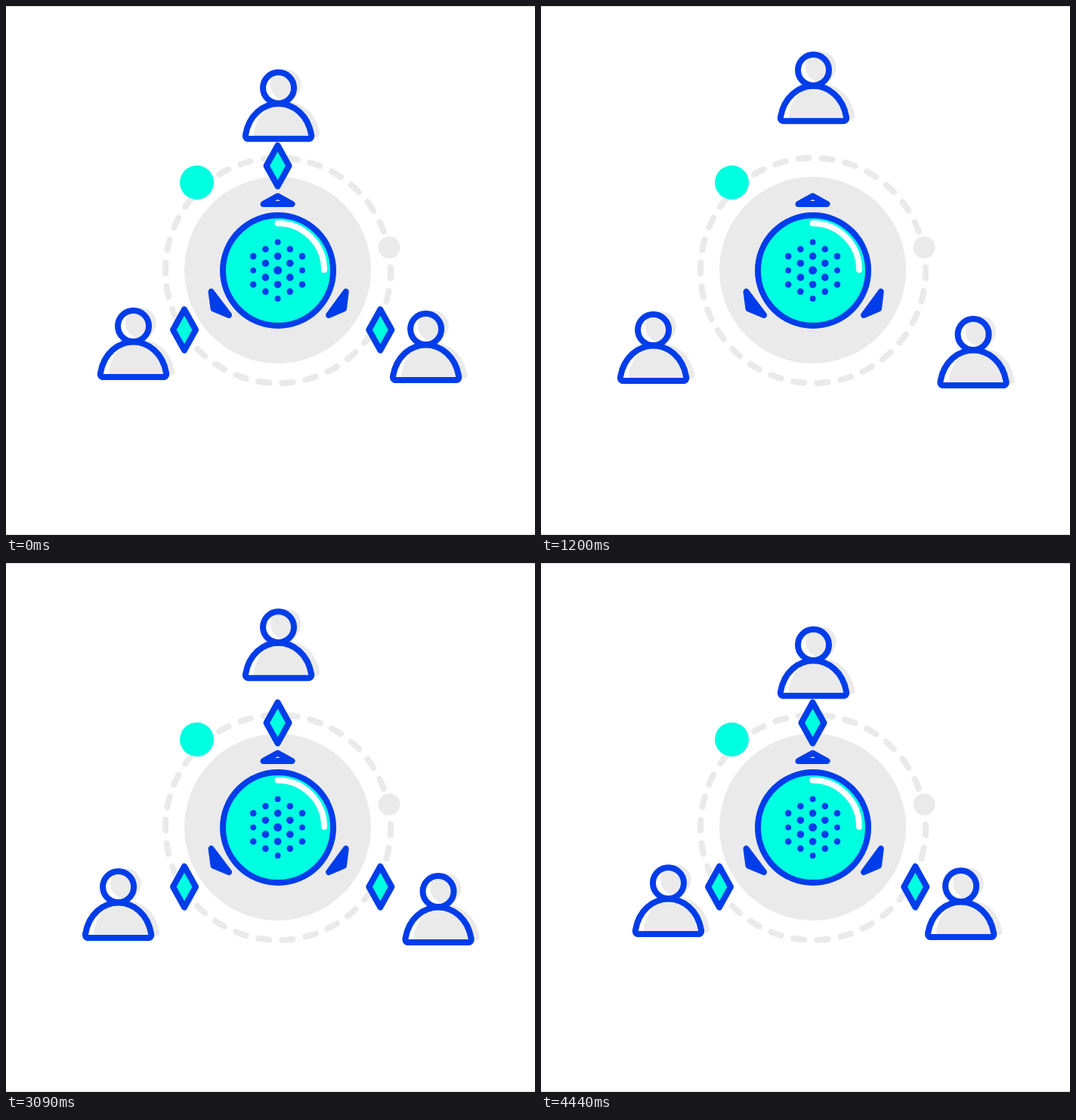
An HTML page for the animation above (4.5 s loop, 700 px wide and 700 px high).

```html
<!DOCTYPE html>
<html lang="en">
<head>
<meta charset="utf-8">
<title>Orb and people</title>
<style>
  html, body { margin: 0; width: 100%; height: 100%; overflow: hidden; background: #fff; }
  svg { display: block; width: 100vw; height: 100vh; }
  .gray { fill: #eaeaea; }
  .mint { fill: #00ffe1; }
  .blue { fill: #003dea; }
  .line { stroke: #003dea; stroke-width: 8; stroke-linejoin: round; }
  .hollow { fill: none; }
</style>
</head>
<body>
<svg id="stage" viewBox="0 0 700 700">
  <defs>
    <path id="body" d="M-39 67.5H39Q44.5 67.5 43.5 62C39 36 20 21 0 21C-20 21-39 36-43.5 62Q-44.5 67.5-39 67.5Z"/>
    <g id="person">
      <circle class="gray" cx="9.8" cy="-4" r="20.3"/>
      <use class="gray" href="#body" x="11" y="-2.5"/>
      <circle class="line hollow" r="20.5"/>
      <use class="line hollow" href="#body"/>
    </g>
  </defs>

  <path d="M0 .5H700M0 699.5H700" stroke="#dcdcdc"/>
  <circle cx="360" cy="350" r="149" fill="none" stroke="#eaeaea" stroke-width="8" stroke-linecap="round"
    pathLength="360" stroke-dasharray="5.4 6.6" transform="rotate(-1.5 360 350)"/>
  <circle class="gray" cx="359.5" cy="349.5" r="123.5"/>
  <circle class="gray" cx="507" cy="319.5" r="14.5"/>
  <circle class="mint" cx="252.5" cy="233.5" r="22.5"/>

  <g class="line">
    <path class="gray" d="M340.5 262L359.5 251.5L378.5 262Z"/>
    <path class="blue" d="M271.5 378L274.5 400.5L295 409Z"/>
    <path class="blue" d="M449.7 378L447 400.5L427 409Z"/>
    <circle class="mint" cx="360" cy="350" r="73"/>
  </g>
  <path d="M359.5 287.5A61.5 61.5 0 0 1 421 349" fill="none" stroke="#fff" stroke-width="8" stroke-linecap="round"/>
  <g id="grid" class="blue"></g>
  <g id="gems"></g>
  <g id="people"></g>
</svg>
<script>
const LOOP = 4500, STEP = 30;
const $ = id => document.getElementById(id);
const lerp = (a, b, p) => a + (b - a) * p;
const mix = (a, b, p) => a.map((v, i) => lerp(v, b[i], p));
const span = (t, from, to) => Math.min(1, Math.max(0, (t - from) / (to - from)));
const easeInOut = p => p < .5 ? 4 * p ** 3 : 1 - 4 * (1 - p) ** 3;

function add(parent, tag, attrs) {
  const el = document.createElementNS('http://www.w3.org/2000/svg', tag);
  for (const k in attrs) el.setAttribute(k, attrs[k]);
  return parent.appendChild(el);
}

// Interpolates rows of [key, ...values], sorted by key.
function track(rows, x) {
  let i = 1;
  while (i < rows.length - 1 && x > rows[i][0]) i++;
  const [a, b] = [rows[i - 1], rows[i]];
  return mix(a, b, span(x, a[0], b[0])).slice(1);
}

// Speaker holes: hexagonal rows, larger towards the middle.
for (let c = -2; c <= 2; c++) {
  const n = 5 - Math.abs(c);
  for (let i = 0; i < n; i++) {
    const x = c * 16.2, y = (i - (n - 1) / 2) * 18.7;
    const d = Math.hypot(x, y);
    const r = d < 1 ? 5.5 : d < 20 ? 4.8 : c === 0 || Math.abs(y) > 30 || Math.abs(y) < 1 ? 3.9 : 4.3;
    add($('grid'), 'circle', { cx: 359.6 + x, cy: 349.8 + y, r });
  }
}

const people = [
  { near: [360.5, 108.3], far: [360.5, 84.7] },
  { near: [168.5, 423.5], far: [148.6, 428.5] },
  { near: [555.6, 427.5], far: [572, 434.5] }
].map(p => ({ ...p, el: add($('people'), 'use', { href: '#person' }) }));

const gems = [
  { home: [359.5, 211.5], out: [359.5, 166.5], from: [359.5, 213], to: [359.5, 166] },
  { home: [236, 428.5], out: [192, 455], from: [262, 411], to: [199.5, 450] },
  { home: [495.3, 428.5], out: [537, 456.5], from: [487, 426], to: [532.5, 455] }
].map(g => ({ ...g, el: add($('gems'), 'path', { class: 'line mint' }) }));

// size, half width, half height, roundness, stroke
const shapes = [
  [0, 0, 0, 1, 0],
  [.25, 6, 6.7, 1, 3],
  [.45, 8.5, 12, 1, 5],
  [.8, 11.5, 21, .6, 7],
  [1, 15, 27, 0, 8]
];
const shrink = [[510, 1], [540, .92], [570, .8], [600, .62], [630, .45], [750, .31], [900, .25], [1170, .17]];
const grow = [[2460, 0], [2490, .05], [2700, .25], [3000, .45], [3030, .62], [3060, .8], [3090, 1]];

// A rhombus that rounds off into an ellipse as k goes from 0 to 1.
function gemPath([x, y], w, h, k) {
  const a = lerp(1 / 3, .552, k), b = lerp(2 / 3, 1, k);
  const pt = (u, v) => `${x + u * w} ${y + v * h}`;
  const arc = (...p) => 'C' + p.map(q => pt(...q)).join(' ');
  return 'M' + pt(0, -1) +
    arc([a, -b], [b, -a], [1, 0]) + arc([b, a], [a, b], [0, 1]) +
    arc([-a, b], [-b, a], [-1, 0]) + arc([-b, -a], [-a, -b], [0, -1]) + 'Z';
}

function gemState(g, t) {
  if (t < 1200) return [mix(g.home, g.out, span(t, 870, 1170) ** 2), track(shrink, t)[0]];
  if (t >= 2490) return [g.home, track(grow, t)[0]];
  for (const start of [1350, 1860]) {
    if (t >= start && t < start + 300) return [mix(g.from, g.to, span(t, start, start + 270)), .25];
  }
  return [g.home, 0];
}

function draw(now) {
  const t = Math.floor((now % LOOP) / STEP) * STEP;
  const away = easeInOut(span(t, 60, 480)) - easeInOut(span(t, 4020, 4440));
  for (const p of people) {
    p.el.setAttribute('transform', `translate(${mix(p.near, p.far, away)})`);
  }
  for (const g of gems) {
    const [at, size] = gemState(g, t);
    const [w, h, k, stroke] = track(shapes, size);
    g.el.setAttribute('d', gemPath(at, w, h, k));
    g.el.style.strokeWidth = stroke;
    g.el.style.display = size > 0 ? '' : 'none';
  }
}

const start = performance.now();
function tick() {
  draw(performance.now() - start);
  requestAnimationFrame(tick);
}
tick();
</script>
</body>
</html>
```
